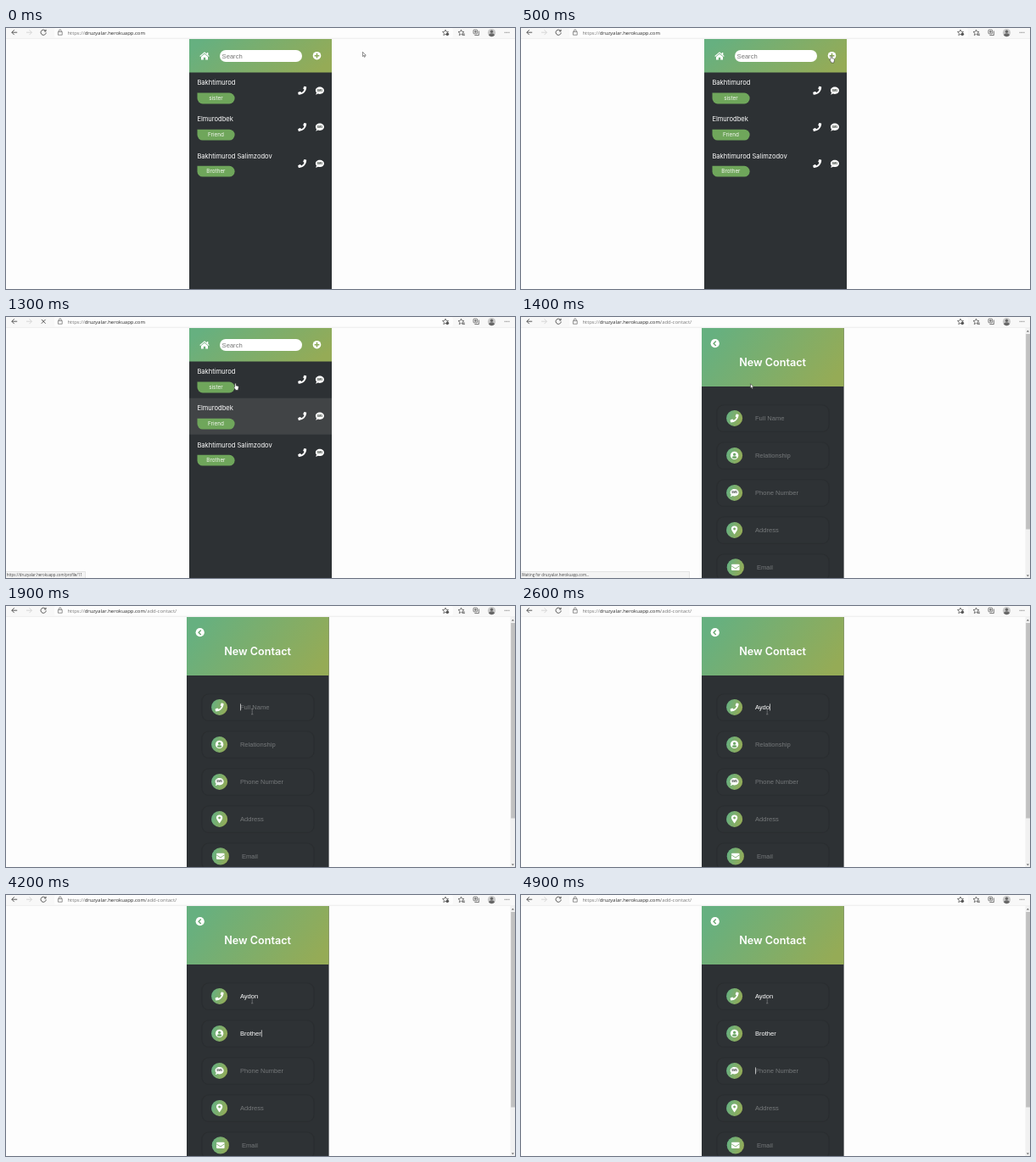
An HTML page for the animation above (5 s loop, 600 px wide and 308 px high).

```html
<!DOCTYPE html>
<html lang="en">
<head>
<meta charset="utf-8">
<title>Contacts demo</title>
<style>
html, body { margin: 0; width: 100%; height: 100%; overflow: hidden; background: #fdfdfd; }
svg { display: block; width: 600px; height: 308px; }
.ui { font-family: "Open Sans", "Noto Sans", sans-serif; }
.app { font-family: Inter, sans-serif; }
.input { font-family: "Liberation Sans", Arial, sans-serif; font-size: 7.6px; }
.line { fill: none; stroke: #4a4a4a; stroke-width: .9; }
</style>
</head>
<body>
<svg id="stage" viewBox="0 0 600 308" xmlns="http://www.w3.org/2000/svg">
  <defs>
    <linearGradient id="green" x1="0" y1=".35" x2="1" y2=".65">
      <stop offset="0" stop-color="#66b080"/><stop offset="1" stop-color="#95ab56"/>
    </linearGradient>
    <g id="phone"><path transform="translate(-5 -5) scale(.0195)" d="M493 25 389 1q-20-4-28 14l-48 112q-6 17 7 28l61 49q-57 120-177 177l-50-60q-12-13-28-7L14 362q-17 8-13 27l24 104q4 19 23 19C304 512 512 304 512 48q0-18-19-23z"/></g>
    <g id="bubble">
      <path d="M0-4.4c2.8 0 5 1.9 5 4.2S2.8 4 0 4q-1.2 0-2.2-.4-1.2.9-2.8.9.9-.9 1.2-2.1Q-5 1.3-5-.2c0-2.3 2.2-4.2 5-4.2z"/>
      <text class="app" y=".8" text-anchor="middle" font-size="2.9" font-weight="700" fill="#3c443d">SMS</text>
    </g>
    <g id="person">
      <circle r="4.7"/>
      <g fill="#6fa867"><circle cy="-1.2" r="1.6"/><path d="M-2.9 2.6q.4-1.7 1.8-1.7h2.2q1.4 0 1.8 1.7Q0 4.8-2.9 2.6z"/></g>
    </g>
    <g id="pin"><path fill-rule="evenodd" d="M0 5Q-3.7.4-3.7-1.3a3.7 3.7 0 0 1 7.4 0Q3.7.4 0 5zM0-2.8a1.4 1.4 0 1 0 .01 0z"/></g>
    <g id="mail"><rect x="-4.8" y="-3.6" width="9.6" height="7.2" rx="1"/><path d="M-4.8-1.6 0 1.5 4.8-1.6" fill="none" stroke="#75a865" stroke-width=".8"/></g>
    <path id="star" d="M0-3.4 1-1.1l2.5.2L1.6.8l.6 2.4L0 1.9l-2.2 1.3.6-2.4-1.9-1.7 2.5-.2z"/>
  </defs>

  <rect width="600" height="308" fill="#fdfdfd"/>

  <g id="listPage">
    <rect x="216" y="13" width="168" height="295" fill="#2d3134"/>
    <rect x="216" y="13" width="168" height="39.5" fill="url(#green)"/>
    <path d="M228.3 33.1 234 28.2l2.8 2.4v-1.5h1.5v2.8l1.4 1.2-.7.8-5-4.3-5 4.3zM230 34l4-3.5 4 3.5v3.5h-2.8v-2.8h-2.4v2.8H230z" fill="#fff"/>
    <rect x="252" y="26" width="97" height="14" rx="7" fill="#fff"/>
    <text class="input" x="254.6" y="35.5" fill="#757575">Search</text>
    <circle cx="366.5" cy="32.7" r="4.8" fill="#fff"/>
    <path d="M363.6 32.7h5.8m-2.9-2.9v5.8" stroke="#8cab5b" stroke-width="1.5"/>
    <rect id="hoverRow" x="216" y="95.7" width="168" height="43" fill="#414446"/>
    <g id="rows"></g>
  </g>

  <g id="formPage">
    <rect x="213" y="13" width="167.6" height="295" fill="#2d3134"/>
    <rect x="213" y="13" width="167.6" height="69" fill="url(#green)"/>
    <circle cx="228.7" cy="31.2" r="5.1" fill="#fff"/>
    <path d="m229.8 28.5-2.7 2.7 2.7 2.7" fill="none" stroke="#6aa974" stroke-width="1.4"/>
    <text class="app" x="296.6" y="57.6" text-anchor="middle" font-size="12.6" font-weight="600" fill="#fff">New Contact</text>
    <g id="fields"></g>
    <rect id="caret" width=".7" height="8" fill="#eee"/>
    <rect x="594.5" y="13" width="5.5" height="295" fill="#f1f1f1"/>
    <rect x="595.2" y="20" width="4.8" height="230.5" fill="#c1c1c1"/>
    <path d="m595.8 17.6 1.6-1.8 1.6 1.8zM595.8 304.4l1.6 1.8 1.6-1.8z" fill="#606060"/>
  </g>

  <g class="ui">
    <rect width="600" height="12.7" fill="#f8f8f8"/>
    <rect y="12.4" width="600" height=".5" fill="#e6e6e6"/>
    <rect x="57" y="0" width="470" height="11" rx="2" fill="#fdfdfd"/>
    <path class="line" d="M13.2 5.2H6.8m2.9-2.9L6.8 5.2l2.9 2.9"/>
    <path class="line" d="M24 5.2h6.4m-2.9-2.9 2.9 2.9-2.9 2.9" style="stroke:#d3d3d3"/>
    <path id="reload" class="line" d="M46.8 3.7a3.1 3.1 0 1 0 .4 1.7M47 1.8v2.1h-2.1"/>
    <path id="stop" class="line" d="m41.8 2.9 4.8 4.8m0-4.8-4.8 4.8"/>
    <path class="line" d="M61.4 4.4h4.8v3.8h-4.8zM62.5 4.4V3.2q0-1.3 1.3-1.3t1.3 1.3v1.2" style="stroke-width:.6"/>
    <text x="72.4" y="7.9" font-size="5.95" fill="#777">https://<tspan fill="#262626">druzyalar.herokuapp.com</tspan><tspan id="path"></tspan></text>
    <g class="line" style="stroke-width:.7">
      <use href="#star" x="518" y="5.4"/>
      <use href="#star" x="536.5" y="5.4"/>
      <path d="M538 7h3m-2 1.4h2"/>
      <rect x="551" y="2.2" width="4.6" height="4.6" rx=".7"/>
      <path d="M552.4 8.5h5v-5m-4-.4v2.8m-1.4-1.4h2.8"/>
    </g>
    <circle cx="520.4" cy="7.3" r="1.7" fill="#555"/>
    <circle cx="572.5" cy="5.6" r="4.6" fill="#c9c9c9"/>
    <path d="M568.9 8.4q.7-2.2 3.6-2.2t3.6 2.2q-3.6 3.6-7.2 0z" fill="#666"/>
    <circle cx="572.5" cy="4.2" r="1.7" fill="#666"/>
    <path d="M587.8 5.3h.9m1.4 0h.9m1.4 0h.9" stroke="#333" stroke-width=".9"/>
    <g id="status">
      <rect id="statusBox" x="-1" y="300.6" height="9" fill="#f4f4f4" stroke="#cfcfcf" stroke-width=".5"/>
      <text id="statusText" x=".8" y="306" font-size="4.4" fill="#444"></text>
    </g>
  </g>

  <g id="cursor">
    <path id="arrow" d="M0 0v5.3l1.2-1.1.8 1.9.9-.4-.8-1.8h1.7z" fill="#fff" stroke="#222" stroke-width=".5"/>
    <path id="hand" d="M-.3.5q.8-1.1 1.5 0v2.2l2.3.6q.9.3.8 1.2l-.6 2.6v.9H.4v-.8L-1.5 4.6q.2-1 1.2-.2z" fill="#fff" stroke="#222" stroke-width=".5"/>
    <path id="beam" d="M-1.2 0h2.4M0 0v6.4m-1.2 0h2.4" fill="none" stroke="#8b8d8f" stroke-width=".6"/>
  </g>
</svg>
<script>
const LOOP = 5000, STEP = 100;
const $ = id => document.getElementById(id);
const show = (id, on) => $(id).setAttribute("display", on ? "inline" : "none");

const contacts = [["Bakhtimurod", "sister"], ["Elmurodbek", "Friend"], ["Bakhtimurod Salimzodov", "Brother"]];
$("rows").innerHTML = contacts.map(([name, relation], i) => `
  <g class="app" transform="translate(216 ${52.6 + i * 43.1})" fill="#fff">
    <text x="9.4" y="14.8" font-size="7.55">${name}</text>
    <path d="M9.5 24H47.2a6.4 6.4 0 0 1 0 12.8H15.9a6.4 6.4 0 0 1-6.4-6.4z" fill="#6fa65b"/>
    <text x="31.4" y="32.7" text-anchor="middle" font-size="6.35" fill="#f4f8f1">${relation}</text>
    <use href="#phone" x="133.2" y="21.2"/>
    <use href="#bubble" x="153.9" y="21.3"/>
  </g>`).join("");

const fields = [
  { label: "Full Name", icon: "phone", value: "Aydon", keys: [2300, 2400, 2500, 2600, 2700], focus: 1900 },
  { label: "Relationship", icon: "person", value: "Brother", keys: [3400, 3500, 3600, 3700, 3800, 3900, 4100], focus: 3100 },
  { label: "Phone Number", icon: "bubble", focus: 4900 },
  { label: "Address", icon: "pin" },
  { label: "Email", icon: "mail", shift: 1.2 }
];
$("fields").innerHTML = fields.map(({ icon, shift = 0 }, i) => `
  <g transform="translate(0 ${119.4 + i * 44})">
    <rect x="231" y="-15.5" width="132" height="31.5" rx="8" fill="#2e3235" stroke="#292c2f" stroke-width="1.2" stroke-opacity=".65"/>
    <circle cx="${251.6 + shift}" r="${9.5 + shift / 2}" fill="url(#green)"/>
    <use href="#${icon}" x="${251.6 + shift}" fill="#fff"/>
    <text class="input" x="${275.9 + shift * 1.7}" y="2.6"></text>
  </g>`).join("");
const inputs = [...$("fields").querySelectorAll(".input")];

// time, x, y, shape
const pointer = [
  [0, 420.5, 28.3, "arrow"], [100, 419, 28.5, "arrow"], [400, 373, 32, "arrow"], [500, 365.2, 33, "hand"],
  [900, 365.2, 33, "hand"], [1000, 360, 42, "arrow"], [1100, 338, 82, "hand"], [1200, 302, 106, "hand"],
  [1300, 270, 78.3, "hand"], [1400, 270.5, 78.8, "arrow"], [1500, 270.5, 79, "arrow"],
  [1700, 282, 106, "arrow"], [1900, 290.2, 121.4, "beam"], [LOOP, 290.2, 121.4, "beam"]
];

function drawPointer(t) {
  const i = pointer.findIndex((p, n) => t >= p[0] && t < pointer[n + 1][0]);
  const [t0, x0, y0, shape] = pointer[i], [t1, x1, y1] = pointer[i + 1];
  const k = (t - t0) / (t1 - t0);
  $("cursor").setAttribute("transform", `translate(${x0 + (x1 - x0) * k} ${y0 + (y1 - y0) * k})`);
  for (const id of ["arrow", "hand", "beam"]) show(id, id === shape);
}

function drawFields(t) {
  const active = fields.findLastIndex(f => t >= f.focus);
  fields.forEach(({ label, value = "", keys = [] }, i) => {
    const typed = value.slice(0, keys.filter(k => t >= k).length);
    inputs[i].textContent = typed || label;
    inputs[i].setAttribute("fill", typed ? "#fff" : "#75787a");
    if (i !== active) return;
    const lastKey = Math.max(fields[i].focus, ...keys.filter(k => t >= k));
    const width = typed ? inputs[i].getComputedTextLength() : 0;
    $("caret").setAttribute("x", 276 + width);
    $("caret").setAttribute("y", 115.4 + i * 44);
    show("caret", (t - lastKey) % 1000 < 500);
  });
  if (active < 0) show("caret", false);
}

function drawStatus(t) {
  const waiting = t >= 1400;
  show("status", t >= 1200 && t < 1800);
  $("statusBox").setAttribute("width", waiting ? 199.5 : 94.5);
  $("statusText").textContent = waiting ? "Waiting for druzyalar.herokuapp.com..." : "https://druzyalar.herokuapp.com/profile/11";
}

function render(ms) {
  const t = Math.floor(ms % LOOP / STEP) * STEP;
  const onForm = t >= 1400, loading = t >= 700 && !onForm;
  show("listPage", !onForm);
  show("formPage", onForm);
  show("hoverRow", t >= 1200);
  show("reload", !loading);
  show("stop", loading);
  $("path").textContent = onForm ? "/add-contact/" : "";
  drawFields(t);
  drawStatus(t);
  drawPointer(t);
}

const start = performance.now();
function tick() {
  render(performance.now() - start);
  requestAnimationFrame(tick);
}
tick();
</script>
</body>
</html>
```
